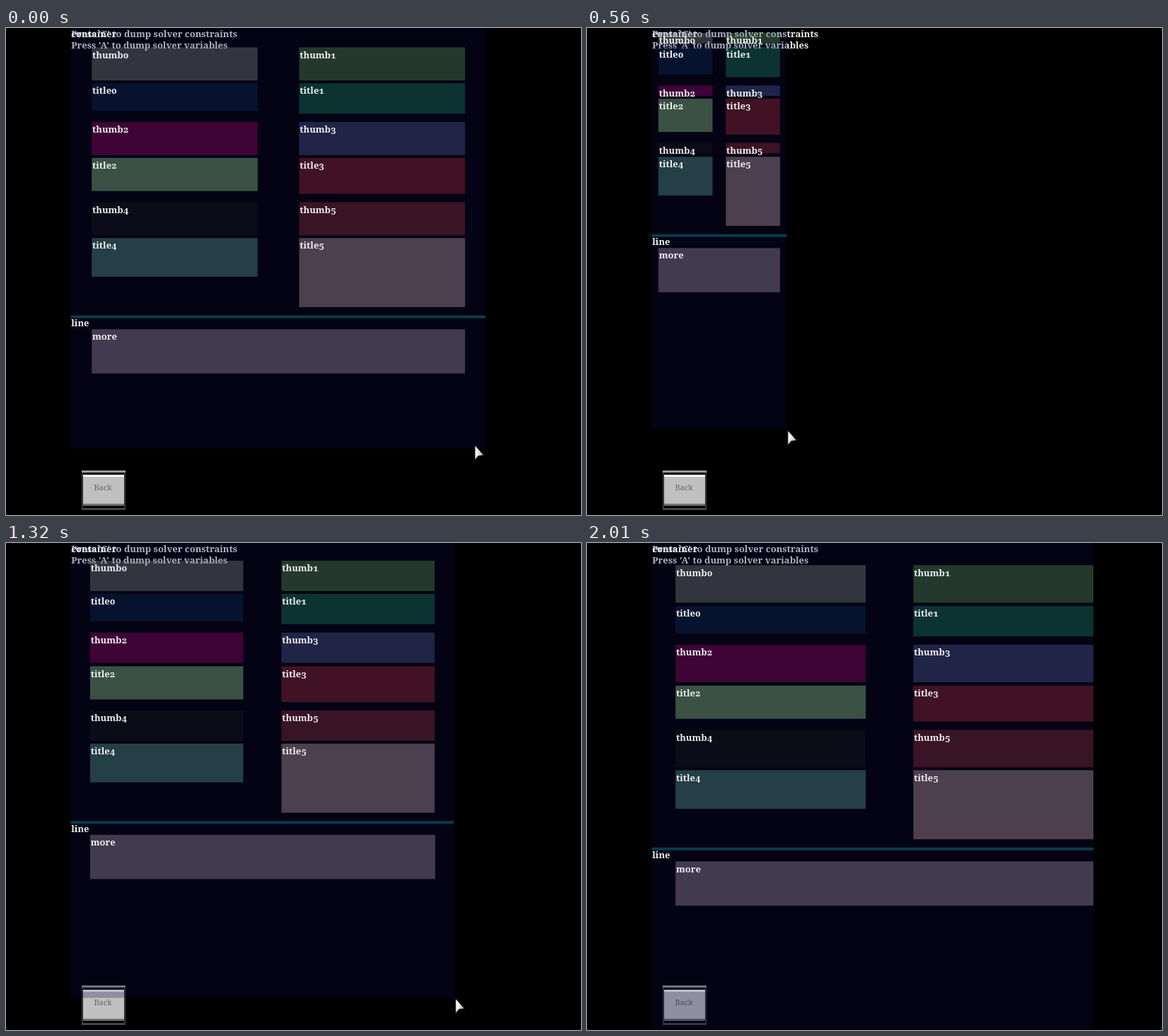
These frames come from a looping animation (813 by 689 pixels, 2290 ms). An HTML page with a canvas:

```html
<!DOCTYPE html>
<html lang="en">
<head>
<meta charset="utf-8">
<title>Constraint layout resize</title>
<style>
html, body { margin: 0; width: 100%; height: 100%; overflow: hidden; background: #000; }
canvas { display: block; font-variant-numeric: oldstyle-nums; font-feature-settings: "onum"; }
</style>
</head>
<body>
<canvas id="stage" width="813" height="689"></canvas>
<script>
const canvas = document.getElementById('stage');
const ctx = canvas.getContext('2d');
const LOOP = 2290, STEP = 70;
const SCALE = 0.782;          // layout units to stage pixels
const LEFT = 117, TOP = -3;   // container origin in layout units
const LAG = 0.2;              // steps the container trails the pointer
const ALPHA = 0.35;
const BACK = [5, 4, 20];

const easeOut = (steps, power) => k => 1 - (1 - k / steps) ** power;
const sigmoid = (rate, middle) => k => 1 / (1 + Math.exp(-rate * (k - middle)));

// Pointer drags: each runs along a bowed line and then rests
const drags = [
  { start: 0, steps: 8, from: [663, 591], to: [284, 570], bow: -35, ease: easeOut(8, 1.75) },
  { start: 690, steps: 11, from: [284, 570], to: [637.5, 645.5], bow: 9, ease: sigmoid(1.05, 3.95) },
  { start: 1590, steps: 6, from: [637.5, 645.5], to: [766.5, 690], bow: -8, ease: sigmoid(2, 3.12) }
];

const thumbs = ['#32353e', '#243a2c', '#3e0536', '#212546', '#0c0d18', '#391524'];
const titles = ['#08142e', '#0c3432', '#3c5244', '#401324', '#244046', '#4c414e'];
const titleHeight = n => n < 5 ? 50 + 5 * n : 125;

function pathAt({ from, to, bow, ease }, k) {
  const e = ease(k);
  return [
    from[0] + (to[0] - from[0]) * e,
    from[1] + (to[1] - from[1]) * e + bow * Math.sin(Math.PI * e)
  ];
}

function poseAt(time) {
  const drag = drags.findLast(d => time >= d.start + (d.start && STEP));
  const k = Math.min(drag.steps, Math.floor((time - drag.start) / STEP));
  return { tip: pathAt(drag, k), corner: pathAt(drag, k - LAG) };
}

function rect(color, x, y, w, h) {
  ctx.fillStyle = color;
  ctx.fillRect(x, y, w, h);
}

function label(text, x, y) {
  ctx.font = 'bold 16.6px "Noto Serif", serif';
  ctx.fillStyle = '#eee';
  ctx.fillText(text, x, y);
}

// Translucent ink that looks like the given colour over the container
function ink(hex) {
  const mix = BACK.map((back, i) => {
    const value = parseInt(hex.slice(1 + 2 * i, 3 + 2 * i), 16);
    return Math.max(0, Math.round((value - back * (1 - ALPHA)) / ALPHA));
  });
  return `rgba(${mix.join()},${ALPHA})`;
}

function box(name, color, x, y, w, h) {
  x = Math.round(x);
  y = Math.round(y);
  rect(ink(color), x, y, Math.round(w), Math.floor(h));
  label(name, x + 1, y + 19.5);
}

function drawButton() {
  rect('#454545', 107, 626, 62, 56);
  rect('#999', 107, 626, 62, 3);
  rect('#000', 108.5, 629, 59, 50);
  rect('#c0c0c0', 109, 632, 58, 42);
  rect('#fff', 109, 632, 58, 3);
  rect('#6e746e', 109, 673, 58, 3);
  ctx.font = '11px "Noto Serif", serif';
  ctx.fillStyle = '#666';
  ctx.textAlign = 'center';
  ctx.fillText('Back', 137, 654);
  ctx.textAlign = 'left';
}

function drawLayout([cornerX, cornerY]) {
  const w = Math.round((cornerX - 2) / SCALE - LEFT);
  const bottom = Math.round((cornerY - 1.5) / SCALE);
  ctx.save();
  ctx.scale(SCALE, SCALE);
  label("Press 'C' to dump solver constraints", LEFT + 1, TOP + 19.5);
  label("Press 'A' to dump solver variables", LEFT + 1, TOP + 39.5);
  rect('rgba(18,14,74,0.27)', LEFT, TOP, w, bottom - TOP);
  label('container', LEFT + 1, TOP + 19.5);

  const thumbH = 0.08 * w;
  let y = TOP + 0.05 * w;
  for (let n = 0; n < 6; n++) {
    const x = LEFT + (n % 2 ? 0.55 : 0.05) * w;
    box('thumb' + n, thumbs[n], x, y, 0.4 * w, thumbH);
    box('title' + n, titles[n], x, y + thumbH + 5, 0.4 * w, titleHeight(n));
    if (n % 2) y += thumbH + titleHeight(n) + 20;
  }
  box('line', '#083e4c', LEFT, y, w, 5);
  box('more', '#433b4e', LEFT + 0.05 * w, y + 25, 0.9 * w, 80);
  ctx.restore();
}

function drawPointer([x, y]) {
  ctx.save();
  ctx.translate(x, y);
  ctx.beginPath();
  ctx.moveTo(0.5, 0.5);
  ctx.lineTo(0.5, 19);
  ctx.lineTo(4.5, 14);
  ctx.lineTo(11.5, 13);
  ctx.closePath();
  ctx.lineWidth = 2.5;
  ctx.lineJoin = 'round';
  ctx.strokeStyle = '#1a2226';
  ctx.stroke();
  const shade = ctx.createLinearGradient(1, 10, 11, 13);
  shade.addColorStop(0, '#fff');
  shade.addColorStop(1, '#b4bcbc');
  ctx.fillStyle = shade;
  ctx.fill();
  ctx.restore();
}

function draw(time) {
  const { tip, corner } = poseAt(time);
  rect('#000', 0, 0, 813, 689);
  ctx.save();
  ctx.beginPath();
  ctx.rect(0, 0, 716, 687);
  ctx.clip();
  drawButton();
  drawLayout(corner);
  drawPointer(tip);
  ctx.restore();
}

const begin = performance.now();
function tick() {
  draw((performance.now() - begin) % LOOP);
  requestAnimationFrame(tick);
}
tick();
</script>
</body>
</html>
```
